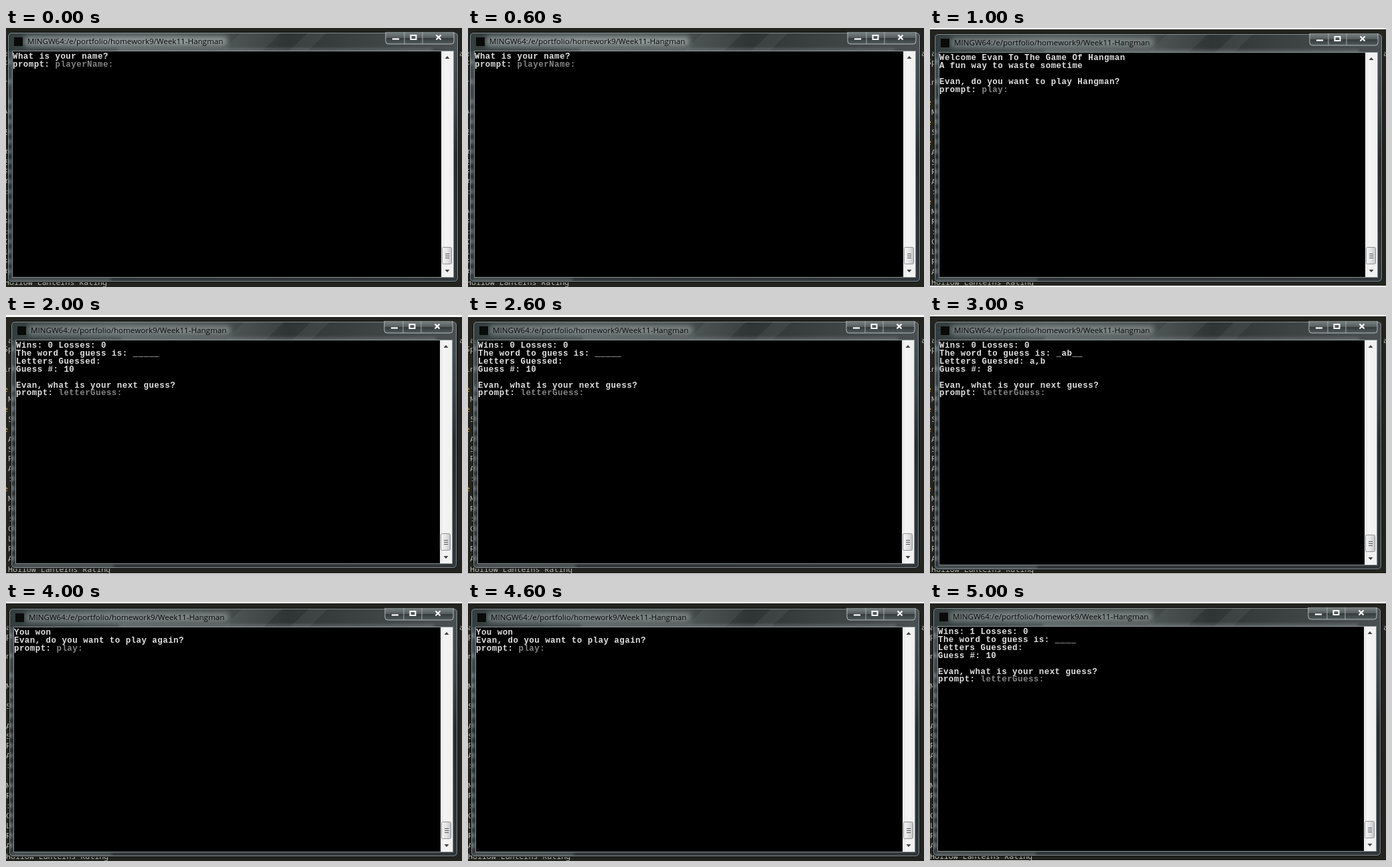
Write an HTML page that moves like this. It is 681 by 388 pixels and loops after 6 s.

```html
<!DOCTYPE html>
<html lang="en">
<head>
<meta charset="utf-8">
<title>Hangman in a console</title>
<style>
  html, body { margin: 0; width: 100%; height: 100%; overflow: hidden; background: #fff; }
  svg { display: block; width: 681px; height: 388px; }
  text { white-space: pre; }
  .code { font: 11.6px "Noto Sans Mono", monospace; fill: #b9bbb4; }
  .title { font: 11.6px "Open Sans", sans-serif; fill: #050708; }
  .term { font: bold 12.4px "Liberation Mono", monospace; letter-spacing: .5px; fill: #e2e2e2; }
  .var { fill: #858585; }
</style>
</head>
<body>
<svg id="stage" viewBox="0 0 681 388">
  <defs>
    <linearGradient id="bar" x1="0" x2="1" y1="0" y2="0">
      <stop offset="0" stop-color="#343d3e"/>
      <stop offset=".25" stop-color="#4c5556"/>
      <stop offset=".5" stop-color="#444a4a"/>
      <stop offset=".62" stop-color="#2f3434"/>
      <stop offset=".8" stop-color="#3d4343"/>
      <stop offset="1" stop-color="#4a5052"/>
    </linearGradient>
    <linearGradient id="side" x1="0" x2="0" y1="0" y2="1">
      <stop offset="0" stop-color="#4b5457"/>
      <stop offset=".3" stop-color="#3a4245"/>
      <stop offset=".5" stop-color="#262b2d"/>
      <stop offset="1" stop-color="#31373a"/>
    </linearGradient>
    <linearGradient id="key" x1="0" x2="0" y1="0" y2="1">
      <stop offset="0" stop-color="#7c8384"/>
      <stop offset=".48" stop-color="#565d5e"/>
      <stop offset=".5" stop-color="#343a3b"/>
      <stop offset="1" stop-color="#525a5b"/>
    </linearGradient>
    <linearGradient id="track" x1="0" x2="1" y1="0" y2="0">
      <stop offset="0" stop-color="#e6e6e6"/>
      <stop offset=".3" stop-color="#f4f4f4"/>
      <stop offset="1" stop-color="#f0f0f0"/>
    </linearGradient>
    <linearGradient id="thumb" x1="0" x2="1" y1="0" y2="0">
      <stop offset="0" stop-color="#f5f5f5"/>
      <stop offset=".5" stop-color="#e4e4e5"/>
      <stop offset="1" stop-color="#c4c5c8"/>
    </linearGradient>
    <filter id="soft" x="-50%" y="-50%" width="200%" height="200%">
      <feGaussianBlur stdDeviation="4"/>
    </filter>
    <filter id="haze" x="-50%" y="-50%" width="200%" height="200%">
      <feGaussianBlur stdDeviation="2"/>
    </filter>
    <clipPath id="glass"><rect id="glassBox" rx="6"/></clipPath>
  </defs>
  <g id="view"></g>
</svg>
<script>
const STEP = 1000;
const PLAYER = "Evan";
const PITCH = 11.9;
const view = document.getElementById("view");
const glassBox = document.getElementById("glassBox");

// win: left, top, right, bottom; code: x of the editor text; page: top and bottom
const scenes = [
  { win: [2, 6, 676, 381], code: -2, page: [0, 388], glow: .62,
    lines: ["What is your name?", "prompt: |playerName:"] },
  { win: [6, 8, 676, 381], code: 2, page: [2, 386], glow: .45,
    lines: [`Welcome ${PLAYER} To The Game Of Hangman`, "A fun way to waste sometime", "",
      `${PLAYER}, do you want to play Hangman?`, "prompt: |play:"] },
  { win: [7, 9, 674, 380], code: 3, page: [3, 387], glow: .45,
    lines: round(0, "_____", "", 10) },
  { win: [6, 9, 675, 382], code: 2, page: [2, 387], glow: .45,
    lines: round(0, "_ab__", " a,b", 8) },
  { win: [4, 9, 675, 382], code: 0, page: [2, 388], glow: .45,
    lines: ["You won", `${PLAYER}, do you want to play again?`, "prompt: |play:"] },
  { win: [4, 8, 674, 381], code: 0, page: [2, 387], glow: .45,
    lines: round(1, "____", "", 10) }
];

function round(wins, word, letters, left) {
  return [`Wins: ${wins} Losses: 0`, `The word to guess is: ${word}`,
    `Letters Guessed:${letters}`, `Guess #: ${left}`, "",
    `${PLAYER}, what is your next guess?`, "prompt: |letterGuess:"];
}

const rect = (x, y, w, h, fill, more = "") =>
  `<rect x="${x}" y="${y}" width="${w}" height="${h}" fill="${fill}" ${more}/>`;
const path = (d, more) => `<path d="${d}" ${more}/>`;
const text = (x, y, kind, s, more = "") =>
  `<text x="${x}" y="${y}" class="${kind}" ${more}>${s}</text>`;

// Editor behind the window; rows start one column left of the stage
const rows = [" a", "Sp", "", "in", "", "e", " M", "e", " S", "e", " A", " S", " R",
  " A", " :", "e", " M", " R", " :", " C", " L", " R", " A"];
const rowY = i => (i ? 55 + (i - 1) * 14.95 : 42);

function editor({ code, page }) {
  const [top, bottom] = page;
  const marks = rows.map((s, i) =>
    text(code - 7, rowY(i), "code", s, s === "e" ? 'style="fill:#d9b45c"' : ""));
  return rect(0, top, 681, bottom - top, "#23241f") + marks.join("") +
    text(677, 42, "code", "a") +
    text(code, 385, "code", "Hollow Lanterns Rating");
}

function buttons(r, t) {
  const x = r - 110, y = t, mid = t + 8;
  const edge = `M${x} ${y}v14q0 4 4 4h94q4 0 4-4v-14`;
  const cuts = `M${x + 28} ${y}v18M${x + 55} ${y}v18`;
  return path(edge, 'fill="url(#key)" stroke="#b4baba"') +
    path(cuts, 'stroke="#a4abab"') +
    rect(x + 9.5, mid + 1, 11, 3, "#fff", 'stroke="#303637" stroke-width=".7"') +
    rect(x + 37.5, mid - 3, 8, 6, "none", 'stroke="#fff" stroke-width="2"') +
    path(`M${x + 75.5} ${mid - 3.5}l7 7m0-7l-7 7`, 'stroke="#fff" stroke-width="2.2"');
}

function scrollbar(x, top, bottom) {
  const c = x + 9, y = bottom - 45;
  const grip = [0, 3, 6].map(d => `M${c - 3} ${y + 10.5 + d}h6`).join("");
  return rect(x, top, 18, bottom - top, "url(#track)") +
    path(`M${c - 3.5} ${top + 11}l3.5-4 3.5 4zM${c - 3.5} ${bottom - 11}l3.5 4 3.5-4z`, 'fill="#404040"') +
    rect(x + 1.5, y + .5, 14, 25, "url(#thumb)", 'rx="2" stroke="#8f9194"') +
    path(grip, 'stroke="#55585b"');
}

function frame({ win: [l, t, r, b], glow }) {
  const w = r - l, h = b - t;
  const blobs = rows.map((s, i) =>
    s && i ? rect(l - 1, rowY(i) - 8, 7, 7, "#a5b4b8", 'opacity=".5"') : "").join("");
  const glass = rect(l, t, w, h, "url(#side)") +
    rect(l, t, w, 29, "url(#bar)") +
    path(`M${l + 350} ${t}h60l-30 29h-60zM${l + 450} ${t}h28l-30 29h-28z`, 'fill="#828a8a" opacity=".13"') +
    `<g filter="url(#haze)">${blobs}` +
    rect(l + 165, t + 25, 470, 4, "#9aa3a3", 'opacity=".45"') +
    rect(l + 4, b - 6, 150, 5, "#9aa3a3", 'opacity=".35"') + "</g>" +
    rect(l + 26, t + 7, 302, 14, "#c4cccc", `opacity="${glow}" filter="url(#soft)"`);
  return `<g clip-path="url(#glass)">${glass}</g>` +
    rect(l + .5, t + .5, w - 1, h - 1, "none", 'rx="6" stroke="#0b0d0d"') +
    rect(l + 1.5, t + 1.5, w - 3, h - 3, "none", 'rx="5" stroke="#a3adae" stroke-opacity=".75"') +
    rect(l + 7.5, t + 28.5, w - 15, h - 36, "none", 'stroke="#a0a9aa" stroke-opacity=".8"') +
    rect(l + 10, t + 8, 13, 13, "#090a0a") +
    text(l + 30, t + 18, "title", "MINGW64:/e/portfolio/homework9/Week11-Hangman") +
    buttons(r + 1, t);
}

function terminal({ win: [l, t, r, b], lines }) {
  const x = l + 8, top = t + 29, bottom = b - 8;
  const rowsOut = lines.map((s, i) => {
    const [main, name = ""] = s.split("|");
    return text(x, t + 40 + i * PITCH, "term", `${main}<tspan class="var">${name}</tspan>`);
  });
  return rect(x, top, r - 8 - x, bottom - top, "#000") + rowsOut.join("") +
    scrollbar(r - 26, top, bottom);
}

let shown = -1;

function draw(ms) {
  const i = Math.floor(ms / STEP) % scenes.length;
  if (i === shown) return;
  shown = i;
  const scene = scenes[i], [l, t, r, b] = scene.win;
  const box = { x: l, y: t, width: r - l, height: b - t };
  for (const k in box) glassBox.setAttribute(k, box[k]);
  view.innerHTML = editor(scene) + frame(scene) + terminal(scene);
}

const start = performance.now();
function tick() {
  draw(performance.now() - start);
  requestAnimationFrame(tick);
}
tick();
</script>
</body>
</html>
```
